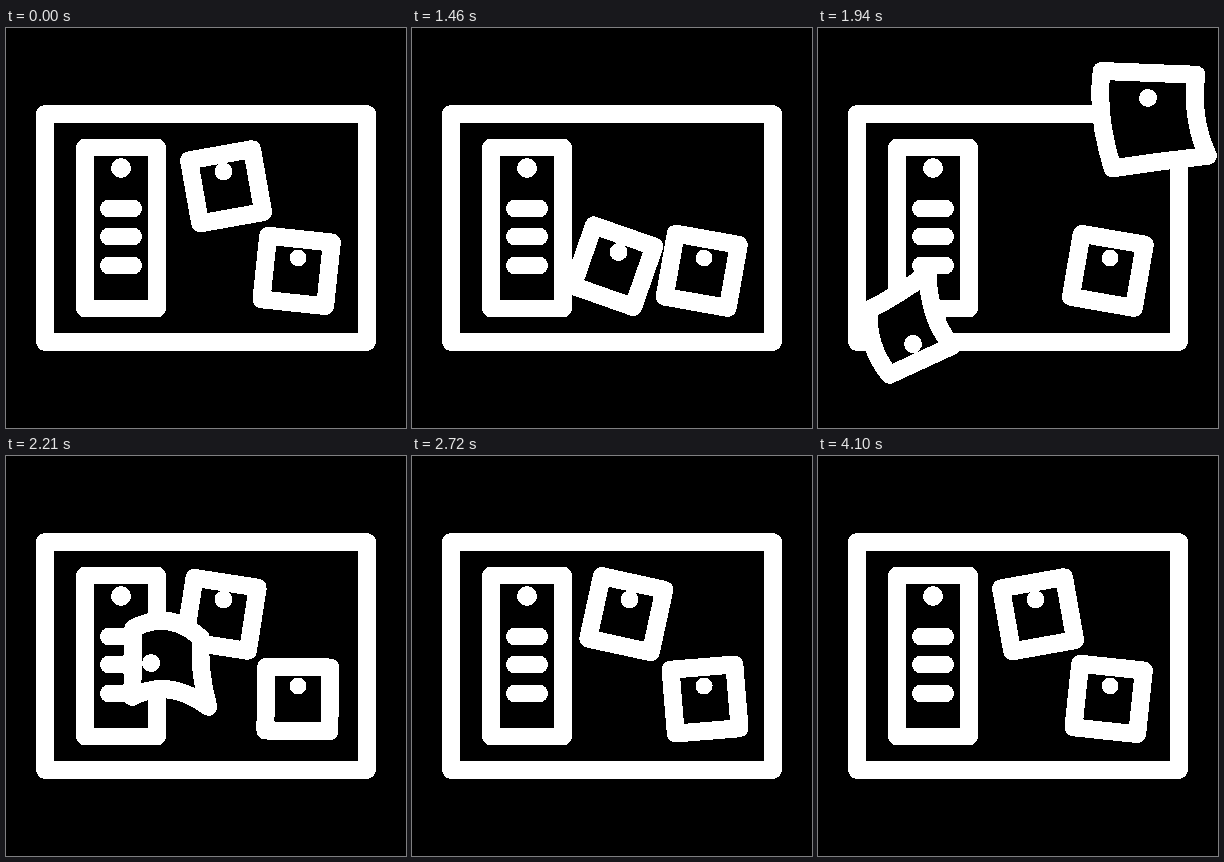
An HTML page with a canvas that plays this animation: 400 by 400 pixels, repeating every 4130 ms.

```html
<!DOCTYPE html>
<html lang="en">
<head>
<meta charset="utf-8">
<title>Pinboard</title>
<style>
html, body { margin: 0; width: 100%; height: 100%; overflow: hidden; background: #000; }
canvas { display: block; width: 400px; height: 400px; }
</style>
</head>
<body>
<canvas id="stage" width="400" height="400"></canvas>
<script>
const SIZE = 400, LOOP = 4130, HOLD = 530, STEP = 30;
const ctx = document.getElementById('stage').getContext('2d', { willReadFrequently: true });

// Time, x and y of the pin as the loose note tumbles off the board.
const tumble = [
  [1070, 217.5, 143.5], [1460, 206.5, 224], [1760, 160, 345], [1940, 95, 316],
  [2210, 145, 207], [2460, 252, 258], [2720, 275, 443]
];

function ease(t, from, to) {
  const u = Math.min(1, Math.max(0, (t - from) / (to - from)));
  return u * u * (3 - 2 * u);
}

function slope(keys, i, axis) {
  if (i === 0) return 0;
  const rise = j => (keys[j + 1][axis] - keys[j][axis]) / (keys[j + 1][0] - keys[j][0]);
  if (i === keys.length - 1) return rise(i - 1);
  const before = keys[i][0] - keys[i - 1][0], after = keys[i + 1][0] - keys[i][0];
  return (rise(i - 1) * after + rise(i) * before) / (before + after);
}

// Smooth curve through timed points.
function along(keys, t, axis) {
  if (t <= keys[0][0]) return keys[0][axis];
  let i = 0;
  while (i < keys.length - 2 && t >= keys[i + 1][0]) i++;
  const a = keys[i], b = keys[i + 1], span = b[0] - a[0];
  const u = (t - a[0]) / span, v = 1 - u;
  return a[axis] * v * v * (1 + 2 * u) + b[axis] * u * u * (3 - 2 * u) +
    span * u * v * (slope(keys, i, axis) * v - slope(keys, i + 1, axis) * u);
}

// The wind first peels the note up, then flaps it while it loops.
function leaving(t) {
  const peel = ease(t, 500, 950) * (1 - ease(t, 1040, 1300));
  const flap = ease(t, 1600, 1940) * (1 - ease(t, 2300, 2650));
  return {
    x: along(tumble, t, 1),
    y: along(tumble, t, 2),
    angle: -10 - 24 * ease(t, 500, 950) + 51 * ease(t, 1040, 1440) + 388 * ease(t, 1400, 2740),
    scale: 1 + 0.07 * flap,
    shift: 16 * peel - 8 * flap,
    tilt: 7.5 * peel + 4 * flap,
    bow: -5 * peel + flap * (9 + 11 * ease(t, 1940, 2210))
  };
}

// A new note flies in, then swings to rest on its pin.
function arriving(t) {
  const far = Math.max(0, (2130 - t) / 190), bend = Math.min(far, 1);
  const swing = 22 * (1 - ease(t, 2400, 4100)) * ease(t, 1850, 2150);
  return {
    x: 217.5 + 112.5 * far,
    y: 143.5 - 73.5 * far,
    angle: -10 * ease(t, 2800, 3600) - swing * Math.cos(Math.PI * (t - 2450) / 380),
    scale: 1 + 0.48 * far,
    shift: 10 * bend,
    tilt: 5.5 * bend,
    bow: -4 * bend
  };
}

function sway(t) {
  return 6 - 11 * ease(t, 500, 1000) + 15 * ease(t, 1000, 1440) -
    15 * ease(t, 1900, 2440) + 11 * ease(t, 2600, 3750);
}

function dot(x, y, r) {
  ctx.fillStyle = '#fff';
  ctx.beginPath();
  ctx.arc(x, y, r, 0, Math.PI * 2);
  ctx.fill();
}

// A square sheet hanging from its pin; its lower end can bend sideways.
function note({ x, y, angle, scale = 1, shift = 0, bow = 0, tilt = 0, drop = 15, pin = 9 }) {
  const h = 32 * scale, dx = shift * scale, dy = tilt * scale;
  const top = (drop - 32) * scale, low = (drop + 32) * scale - dx * 0.4;
  const mid = (top + low) / 2;
  ctx.save();
  ctx.translate(x, y);
  ctx.rotate(angle * Math.PI / 180);
  ctx.beginPath();
  ctx.moveTo(-h, top);
  ctx.lineTo(h, top);
  ctx.quadraticCurveTo(h + bow, mid, h + dx, low - dy);
  ctx.quadraticCurveTo(dx, low - Math.abs(bow) * 0.3, dx - h, low + dy);
  ctx.quadraticCurveTo(bow - h, mid, -h, top);
  ctx.closePath();
  ctx.fillStyle = '#000';
  ctx.fill();
  ctx.stroke();
  dot(0, 0, pin);
  ctx.restore();
}

function board() {
  ctx.strokeRect(39, 86, 322, 228);
  ctx.strokeRect(79, 119.5, 72, 161);
  dot(115, 140, 10);
  for (const y of [180.5, 208.5, 237.5]) {
    ctx.beginPath();
    ctx.moveTo(103, y);
    ctx.lineTo(127, y);
    ctx.stroke();
  }
}

// Pure black and white, without soft edges.
function crisp() {
  const image = ctx.getImageData(0, 0, SIZE, SIZE), d = image.data;
  for (let i = 0; i < d.length; i += 4) d[i] = d[i + 1] = d[i + 2] = d[i] > 135 ? 255 : 0;
  ctx.putImageData(image, 0, 0);
}

function draw(time) {
  const t = time < HOLD ? 0 : HOLD + Math.floor((time - HOLD) / STEP) * STEP;
  ctx.fillStyle = '#000';
  ctx.fillRect(0, 0, SIZE, SIZE);
  ctx.strokeStyle = '#fff';
  ctx.lineWidth = 18;
  ctx.lineJoin = ctx.lineCap = 'round';
  board();
  note({ x: 292, y: 230, angle: sway(t), drop: 13, pin: 8.5 });
  if (t >= 1700) note(arriving(t));
  if (t <= 2720) note(leaving(t));
  crisp();
}

const start = performance.now();
function tick() {
  draw((performance.now() - start) % LOOP);
  requestAnimationFrame(tick);
}
tick();
</script>
</body>
</html>
```
